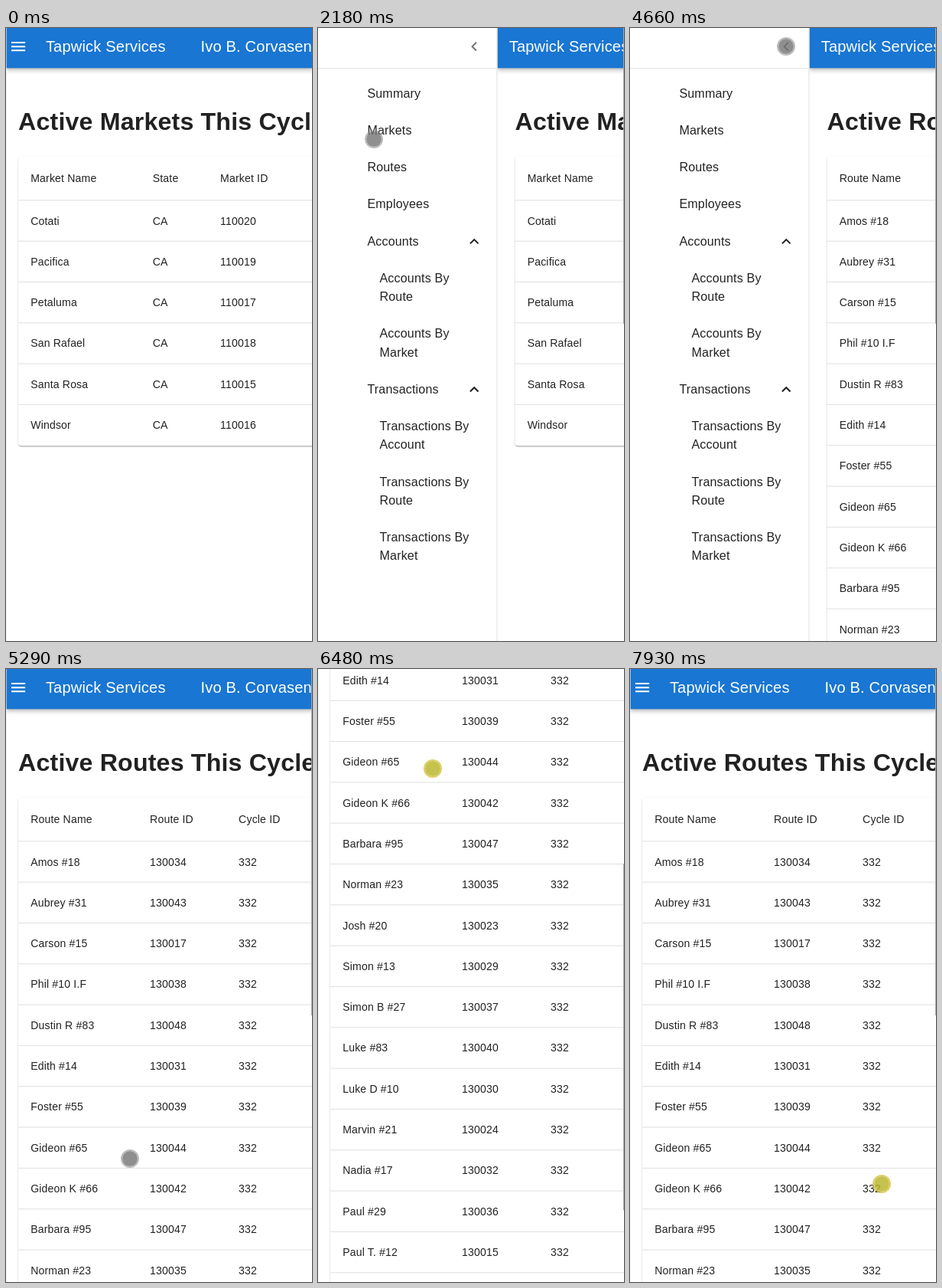
Animation of 400 by 800 pixels, one loop 8 s. Source, as an HTML page:

```html
<!DOCTYPE html>
<html lang="en">
<head>
<meta charset="utf-8">
<title>Market and route tables</title>
<style>
html, body { margin: 0; width: 100%; height: 100%; overflow: hidden; background: #fff; }
body { position: relative; color: rgba(0,0,0,.87); font-family: "Liberation Sans", Arial, sans-serif; }
body *, svg { position: absolute; }
#stage { inset: 0; overflow: hidden; }
#app { inset: 0; transform: scale(1.006); transform-origin: 0 0; }
#page { inset: 0; }
.text { white-space: pre; line-height: 24px; letter-spacing: .15px; }
.bar { left: 0; top: 0; width: 400px; height: 51.6px; background: #1976d2; color: #fff;
  box-shadow: 0 2px 4px -1px rgba(0,0,0,.2), 0 4px 5px rgba(0,0,0,.14), 0 1px 10px rgba(0,0,0,.12); }
.card { left: 16px; top: 166.8px; width: 620px; border-radius: 4px; background: #fff;
  box-shadow: 0 2px 1px -1px rgba(0,0,0,.2), 0 1px 1px rgba(0,0,0,.14), 0 1px 3px rgba(0,0,0,.12); }
.line { left: 0; width: 100%; height: 1px; background: #e0e0e0; }
#drawer { left: 0; top: 0; width: 231.6px; height: 800px; background: #fff; border-right: 1px solid #e0e0e0; }
#rippleBox { left: 0; top: 156px; width: 232px; height: 49.5px; overflow: hidden; }
#ripple { border-radius: 50%; background: #000; }
#thumb { left: 399px; top: 0; width: 1px; background: #a6a6a6; }
#pointer { left: -12px; top: -12px; width: 20px; height: 20px; border: 2px solid; border-radius: 50%; background-clip: padding-box; }
</style>
</head>
<body>
<div id="stage">
  <div id="app">
    <div id="page"></div>
    <div id="drawer"><div id="rippleBox"><div id="ripple"></div></div></div>
  </div>
  <div id="thumb"></div>
  <div id="pointer"></div>
</div>
<script>
const LOOP = 8000, DRAWER = 232.6, HEAD = 57, ROW = 53.02;
const $ = id => document.getElementById(id);

function box(parent, className) {
  const el = document.createElement('div');
  el.className = className;
  parent.append(el);
  return el;
}

// Text placed by its left edge and the middle of its line.
function text(parent, x, y, content, size = 14, weight = 400) {
  const el = box(parent, 'text');
  el.textContent = content;
  el.style.cssText = `left:${x}px;top:${y - 12}px;font-size:${size}px;font-weight:${weight}`;
}

function icon(parent, x, y, path, color) {
  parent.insertAdjacentHTML('beforeend',
    `<svg width="24" height="24" viewBox="0 0 24 24" style="left:${x - 12}px;top:${y - 12}px"><path fill="${color}" d="${path}"/></svg>`);
  return parent.lastElementChild;
}

function tablePage(title, columns, header, rows) {
  const view = box($('page'), 'view');
  text(view, 16, 121.3, title, 32, 700);
  const card = box(view, 'card');
  card.style.height = HEAD + ROW * rows.length + 'px';
  [header, ...rows].forEach((cells, i) => {
    const middle = (i ? HEAD + ROW * (i - .5) : HEAD / 2) - .5;
    cells.forEach((cell, c) => text(card, columns[c] - 16, middle, cell));
    if (i < rows.length) box(card, 'line').style.top = HEAD + ROW * i - 1 + 'px';
  });
  return view;
}

const markets = tablePage('Active Markets This Cycle', [32, 190.6, 278.4],
  ['Market Name', 'State', 'Market ID'],
  [['Cotati', 20], ['Pacifica', 19], ['Petaluma', 17], ['San Rafael', 18], ['Santa Rosa', 15], ['Windsor', 16]]
    .map(([name, id]) => [name, 'CA', 110000 + id]));

const routes = tablePage('Active Routes This Cycle', [32, 187, 302.3],
  ['Route Name', 'Route ID', 'Cycle ID'],
  [['Amos #18', 34], ['Aubrey #31', 43], ['Carson #15', 17], ['Phil #10 I.F', 38], ['Dustin R #83', 48],
   ['Edith #14', 31], ['Foster #55', 39], ['Gideon #65', 44], ['Gideon K #66', 42], ['Barbara #95', 47],
   ['Norman #23', 35], ['Josh #20', 23], ['Simon #13', 29], ['Simon B #27', 37], ['Luke #83', 40],
   ['Luke D #10', 30], ['Marvin #21', 24], ['Nadia #17', 32], ['Paul #29', 36], ['Paul T. #12', 15], ['Vera #19', 20]]
    .map(([name, id]) => [name, 130000 + id, 332]));

const bar = box($('page'), 'bar');
const menu = icon(bar, 16, 24, 'M3 18h18v-2H3zm0-5h18v-2H3zm0-7v2h18V6z', '#fff');
const barText = box(bar, 'labels');
text(barText, 51.6, 24, 'Tapwick Services', 20);
text(barText, 253, 24, 'Ivo B. Corvasen', 20);

const drawer = $('drawer');
box(drawer, 'line').style.top = '51.6px';
icon(drawer, 203, 24, 'M15.41 7.41 14 6l-6 6 6 6 1.41-1.41L10.83 12z', '#757575');

// Each entry is a label, then its sub-entries of two lines.
let itemY = 84.6;
for (const [label, ...children] of [
  ['Summary'], ['Markets'], ['Routes'], ['Employees'],
  ['Accounts', 'Accounts By\nRoute', 'Accounts By\nMarket'],
  ['Transactions', 'Transactions By\nAccount', 'Transactions By\nRoute', 'Transactions By\nMarket']
]) {
  text(drawer, 64, itemY, label, 16);
  if (children.length) icon(drawer, 203, itemY, 'M12 8l-6 6 1.41 1.41L12 10.83l4.59 4.58L18 14z', '#212121');
  itemY += 48;
  for (const child of children) {
    text(drawer, 80, itemY, child, 16);
    itemY += 72;
  }
}

// Pointer stops: time, x, y.
const stops = [
  [460, 334, 764], [1020, 24.5, 27], [1500, 24.5, 27], [2180, 73, 145], [2390, 88, 163], [2530, 89, 164],
  [2740, 111, 187], [3900, 111, 187], [4600, 204, 24], [4760, 204, 24], [5290, 162, 639], [5450, 161, 648],
  [5520, 161, 648], [6480, 150, 130], [6880, 150, 130], [7440, 294, 517], [7720, 323, 642], [7930, 329, 672], [8000, 329, 673]
];

// Monotone cubic through the stops, so rests stay still.
function along(t, axis) {
  const last = stops.length - 1;
  if (t <= stops[0][0]) return stops[0][axis];
  let i = 0;
  while (i < last - 1 && stops[i + 1][0] < t) i++;
  const rate = k => (stops[k + 1][axis] - stops[k][axis]) / (stops[k + 1][0] - stops[k][0]);
  const slope = k => {
    if (k === 0 || k === last) return 0;
    const a = rate(k - 1), b = rate(k);
    return a * b > 0 ? 2 * a * b / (a + b) : 0;
  };
  const span = stops[i + 1][0] - stops[i][0], u = (t - stops[i][0]) / span, v = 1 - u;
  return stops[i][axis] * (1 + 2 * u) * v * v + slope(i) * span * u * v * v
    + stops[i + 1][axis] * u * u * (3 - 2 * u) - slope(i + 1) * span * u * u * v;
}

const clamp = (v, lo = 0, hi = 1) => Math.min(hi, Math.max(lo, v));
const progress = (t, start, length) => clamp((t - start) / length);
const easeOut = u => 1 - (1 - u) ** 3;

function scrollAt(t, y) {
  if (t < 5520) return 0;
  return clamp((t < 6880 ? 633.5 : 653.5) - y, 0, 503.5);
}

function draw(t) {
  const x = along(t, 1), y = along(t, 2), scroll = scrollAt(t, y);
  const open = t >= 1490 && t < 4800;
  const shift = open ? easeOut(progress(t, 1490, 260)) : t < 1490 ? 0 : 1 - easeOut(progress(t, 4800, 230));
  const showRoutes = t >= 3420;

  $('page').style.transform = `translateY(${-scroll / 1.006}px)`;
  markets.style.display = showRoutes ? 'none' : '';
  routes.style.display = showRoutes ? '' : 'none';
  markets.style.transform = routes.style.transform = `translateX(${240 * shift}px)`;
  bar.style.left = DRAWER * shift + 'px';
  menu.style.display = open ? 'none' : '';
  barText.style.left = open ? '-36px' : '0';
  drawer.style.transform = `translateX(${-DRAWER * (1 - shift)}px)`;

  const radius = 107 * easeOut(progress(t, 3350, 600));
  Object.assign($('ripple').style, {
    left: 110.3 - radius + 'px', top: 25 - radius + 'px', width: 2 * radius + 'px', height: 2 * radius + 'px',
    opacity: .067 * (1 - progress(t, 3800, 350))
  });

  Object.assign($('thumb').style, {
    display: t < 1490 ? 'none' : '', height: (open ? 386 : 452) + 'px', transform: `translateY(${scroll * .505}px)`
  });

  const pressed = t >= 5520;
  Object.assign($('pointer').style, {
    display: t < 460 ? 'none' : '', transform: `translate(${x}px,${y}px)`,
    backgroundColor: pressed ? 'rgba(186,182,42,.83)' : 'rgba(112,112,112,.78)',
    borderColor: pressed ? 'rgba(212,192,60,.78)' : 'rgba(140,140,140,.58)'
  });
}

function tick() {
  draw(performance.now() % LOOP);
  requestAnimationFrame(tick);
}
tick();
</script>
</body>
</html>
```
